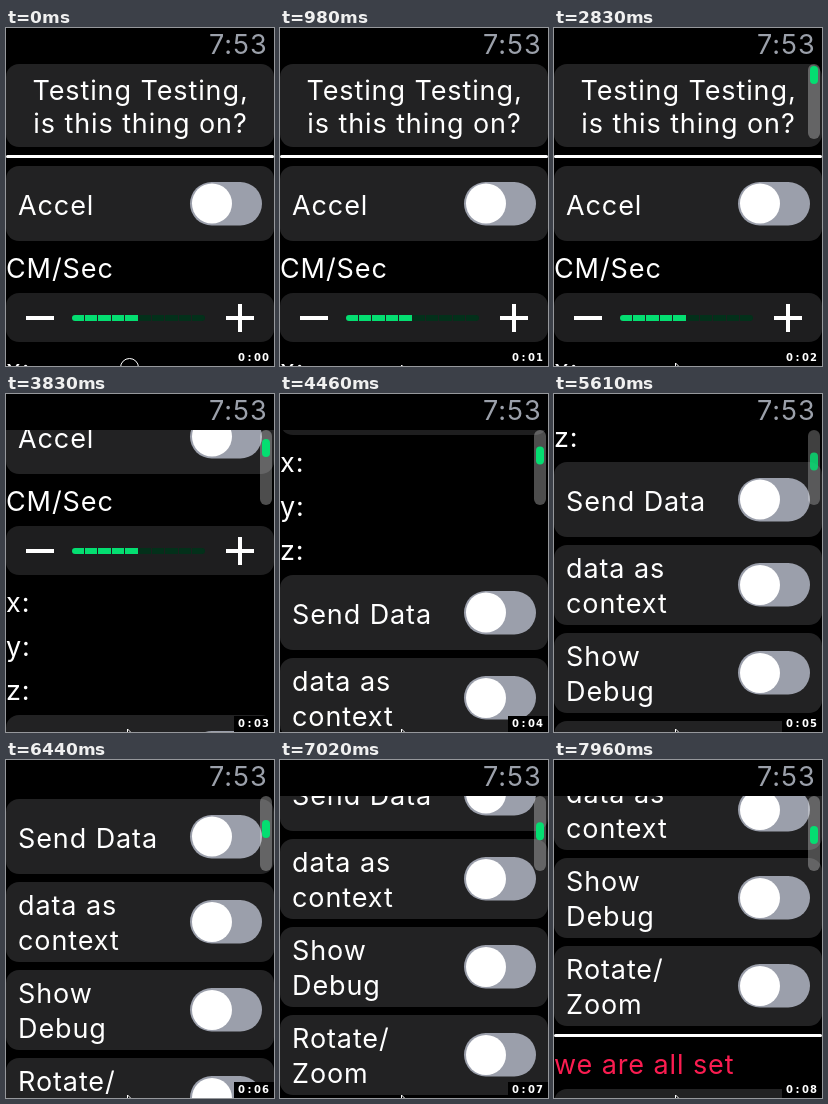
Write an HTML page with a canvas that moves like this. It is 268 px wide and 338 px high and loops after 7.99 s.

```html
<!DOCTYPE html>
<html lang="en">
<head>
<meta charset="utf-8">
<title>Watch settings</title>
<style>
html, body { margin: 0; width: 268px; height: 338px; overflow: hidden; background: #000; }
canvas { display: block; }
</style>
</head>
<body>
<canvas id="stage" width="268" height="338"></canvas>
<script>
const ctx = document.getElementById('stage').getContext('2d');
const LOOP = 7990, CARD = '#222223', GREEN = '#04de71';

// Scroll path: time in ms, offset in px, speed in px/ms
const path = [
  [2830, 0, 0], [3830, 133, .2], [4460, 273, .2], [5320, 386, 0],
  [6220, 386, 0], [6650, 441, 0], [6800, 441, 0], [7020, 458, .08], [7960, 527, .06]
];

const clamp = (v, lo, hi) => Math.min(hi, Math.max(lo, v));

function scrollAt(t) {
  t = clamp(t, 2830, 7960);
  const i = path.findIndex((p, k) => k && t <= p[0]);
  const [t0, a, va] = path[i - 1], [t1, b, vb] = path[i];
  const d = t1 - t0, u = (t - t0) / d;
  return a + (b - a) * u * u * (3 - 2 * u)
    + d * u * (1 - u) * (va * (1 - u) - vb * u);
}

function barAlpha(t) {
  if (t < 2830) return 0;
  if (t < 5600 || t >= 6220) return 1;
  return clamp(1 - (t - 5570) / 240, 0, 1);
}

function box(x, y, w, h, r, color) {
  ctx.fillStyle = color;
  ctx.beginPath();
  ctx.roundRect(x, y, w, h, r);
  ctx.fill();
}

function text(s, x, y, color = '#fff', align = 'left') {
  ctx.font = '27px Inter, Roboto, sans-serif';
  ctx.letterSpacing = '0.9px';
  ctx.fillStyle = color;
  ctx.textAlign = align;
  ctx.fillText(s, x, y);
}

const card = (y, h, color = CARD) => box(0, y, 268, h, 13, color);
const rule = y => box(0, y, 268, 3, 1.5, '#fff');

function toggle(y, h, ...lines) {
  card(y, h);
  const first = lines.length > 1 ? 33 : 49;
  lines.forEach((s, i) => text(s, 12, y + first + 35 * i));
  box(184, Math.round(y + h / 2 - 22), 72, 43.5, 21.75, '#9b9fab');
  box(186, y + h / 2 - 20, 40, 40, 20, '#fff');
}

function slider(y) {
  card(y, 49, '#1e1e1f');
  box(20, y + 23, 28, 4, 0, '#fff');
  box(220, y + 23, 28, 4, 0, '#fff');
  box(232, y + 11, 4, 28, 0, '#fff');
  const edge = i => Math.floor(66 + 13.4 * i);
  for (let i = 0; i < 10; i++) {
    const ends = i === 0 ? [3, 0, 0, 3] : i === 9 ? [0, 3, 3, 0] : 0;
    box(edge(i), y + 22, edge(i + 1) - edge(i) - 1, 6, ends, i < 5 ? GREEN : '#03301a');
  }
}

function content() {
  card(36, 83);
  text('Testing Testing,', 134.5, 72, '#fff', 'center');
  text('is this thing on?', 134.5, 105, '#fff', 'center');
  rule(127);
  toggle(138, 75, 'Accel');
  text('CM/Sec', 0, 250);
  slider(265);
  ['x:', 'y:', 'z:'].forEach((s, i) => text(s, 0, 351 + 44 * i));
  toggle(454, 75, 'Send Data');
  toggle(537, 80, 'data as', 'context');
  toggle(625, 80, 'Show', 'Debug');
  toggle(713, 80, 'Rotate/', 'Zoom');
  rule(801);
  text('we are all set', 0, 841, '#fa1c50');
  card(856, 80);
}

function scrollBar(scroll, alpha) {
  ctx.globalAlpha = alpha;
  box(254, 36, 12, 75, 6, 'rgba(255,255,255,.3)');
  box(256, 38 + scroll * .0531, 8, 18, 4, GREEN);
  ctx.globalAlpha = 1;
}

function pointer(t) {
  ctx.fillStyle = '#000';
  ctx.strokeStyle = '#fff';
  ctx.lineWidth = 1;
  ctx.beginPath();
  if (t < 30) {
    ctx.arc(123.5, 339.5, 9, 0, 7);
  } else {
    const y = t < 170 ? 339 : 337 - 2 * clamp((t - 1960) / 180, 0, 1);
    ctx.moveTo(121.5, y);
    ctx.lineTo(121.5, y + 16);
    ctx.lineTo(132.5, y + 11);
    ctx.closePath();
  }
  ctx.fill();
  ctx.stroke();
}

function clock(t) {
  box(228, 322, 40, 16, 0, '#000');
  ctx.font = 'bold 10px "DejaVu Sans", sans-serif';
  ctx.letterSpacing = '0px';
  ctx.fillStyle = '#fff';
  ctx.textAlign = 'center';
  [...('0:0' + Math.floor(t / 976.5))].forEach((c, i) => ctx.fillText(c, 235.5 + 8 * i, 333));
}

function draw(now) {
  const t = now % LOOP, scroll = scrollAt(t);
  box(0, 0, 268, 338, 0, '#000');
  ctx.save();
  ctx.beginPath();
  ctx.rect(0, 36, 268, 302);
  ctx.clip();
  ctx.translate(0, -Math.round(scroll));
  content();
  ctx.restore();
  text('7:53', 261.5, 26, '#9ba0aa', 'right');
  scrollBar(scroll, barAlpha(t));
  pointer(t);
  clock(t);
}

const start = performance.now();
function tick() {
  draw(performance.now() - start);
  requestAnimationFrame(tick);
}
tick();
</script>
</body>
</html>
```
